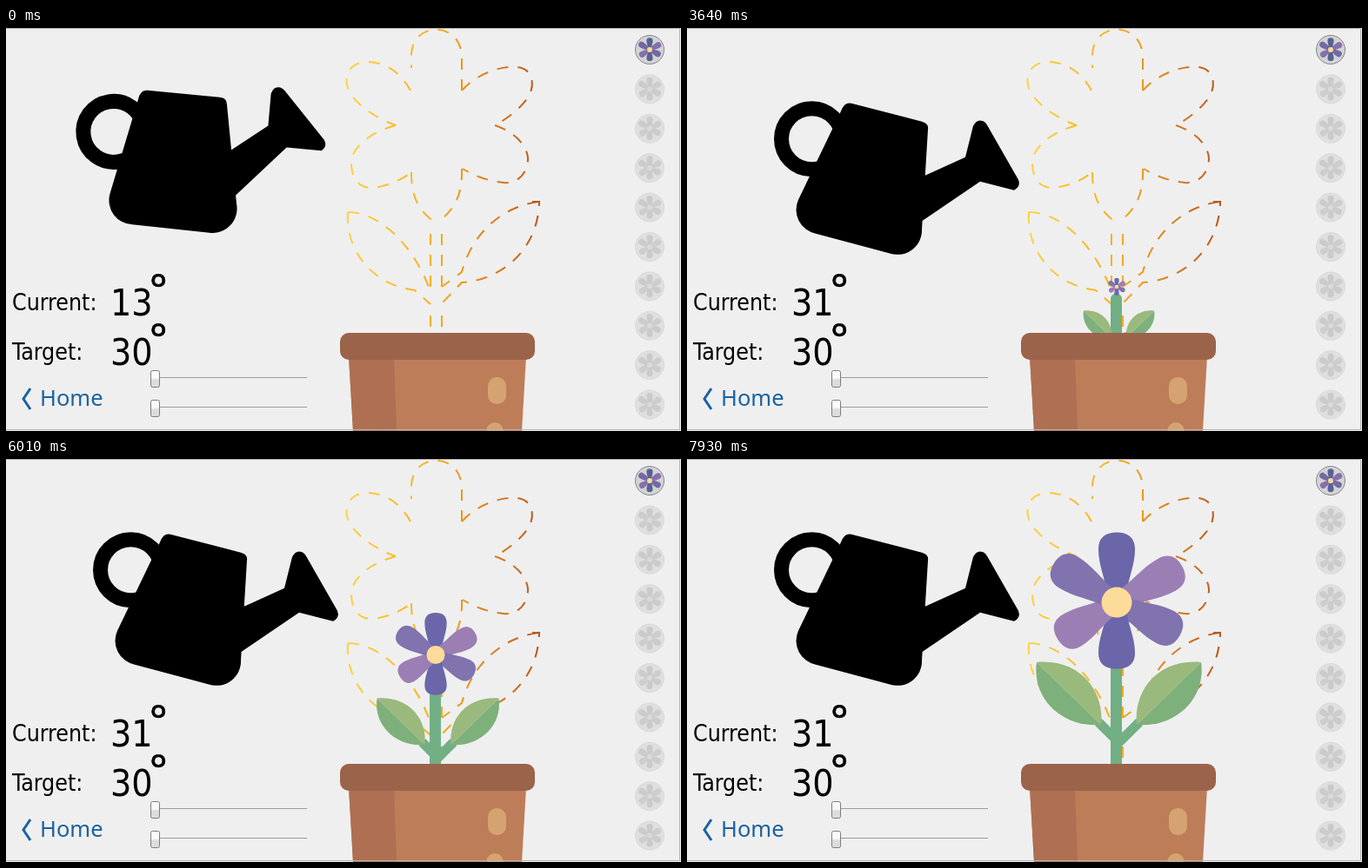
Write an HTML page that moves like this. It is 776x464 px and loops after 8000 ms.

```html
<!DOCTYPE html>
<html lang="en">
<head>
<meta charset="utf-8">
<title>Tilt to water</title>
<style>
  html, body { margin: 0; width: 100%; height: 100%; overflow: hidden; background: #efefef; }
  svg { display: block; width: 100vw; height: 100vh; }
  text { font-family: "DejaVu Sans Condensed", "Noto Sans", sans-serif; }
  .label { font-size: 26.5px; }
  .value { font-size: 42.5px; }
  .degree { font: 48px "Noto Sans", sans-serif; stroke: #000; stroke-width: .6; }
  .home { font: 25.5px "Noto Sans", "Open Sans", sans-serif; fill: #1b629f; }
  .thumb { fill: url(#thumb); stroke: #7c7c7c; }
  .dashes path { fill: none; stroke: url(#warm); stroke-width: 2; stroke-dasharray: 13 11; }
  .stalk { fill: none; stroke: #72af85; }
</style>
</head>
<body>
<svg viewBox="0 0 776 464">
  <defs>
    <linearGradient id="warm" gradientUnits="userSpaceOnUse" x1="390" x2="613" y1="0" y2="0">
      <stop offset="0" stop-color="#ffd23e"/>
      <stop offset=".48" stop-color="#f4ac1c"/>
      <stop offset=".75" stop-color="#d9801f"/>
      <stop offset="1" stop-color="#b9561c"/>
    </linearGradient>
    <linearGradient id="thumb" x1="0" x2="0" y1="0" y2="1">
      <stop offset=".45" stop-color="#fafafa"/>
      <stop offset=".55" stop-color="#dcdcdc"/>
    </linearGradient>
    <path id="petal" d="M-11-8C-13-28-21-42-21-61C-21-74-13-80 0-80S21-74 21-61C21-42 13-28 11-8Z"/>
    <g id="leaf">
      <path fill="#7eb07c" d="M0 0L74-72C80-28 42 4 0 0Z"/>
      <path fill="#9ab97c" d="M0 0C-4-40 25-76 74-72Z"/>
    </g>
  </defs>

  <rect width="776" height="464" fill="#efefef"/>

  <g class="dashes">
    <path d="M524 72V32C522-8 468-8 466 30V46"/>
    <path d="M465 72C453 49 432 38 413 39C391 41 386 62 397 77C407 91 427 105 448 112"/>
    <path d="M524 72C540 54 567 43 588 45C606 47 609 66 600 80C591 93 577 104 562 112"/>
    <path d="M562 112C583 119 599 134 600 150C600 168 587 180 572 178C553 176 538 170 525 162"/>
    <path d="M448 112C423 119 401 133 397 152C396 174 406 184 420 184C437 183 453 176 466 166"/>
    <path d="M466 166C466 192 472 206 488 220V224"/>
    <path d="M524 162C525 190 517 206 501 220V224"/>
    <path d="M488 237V298M488 331V344M501 237V298M501 331V344"/>
    <path d="M393 212C428 212 466 247 486 298"/>
    <path d="M393 212C390 256 421 296 470 302L488 318"/>
    <path d="M612 200C570 206 536 236 524 281L501 298"/>
    <path d="M605 200H613C612 254 571 290 524 293L501 317"/>
  </g>

  <g id="plant">
    <path id="stem" class="stalk" stroke-width="13" stroke-linecap="round"/>
    <path id="stalks" class="stalk" stroke-width="11"/>
    <use id="leafLeft" href="#leaf"/>
    <use id="leafRight" href="#leaf"/>
    <g id="bloom"></g>
  </g>

  <path fill="#bd7d59" d="M394 378H598L593 464H399Z"/>
  <path fill="#ae6f52" d="M394 378H446L449 464H399Z"/>
  <rect x="384" y="351" width="224" height="31" rx="10" fill="#9b634a"/>
  <rect x="554" y="402" width="21" height="31" rx="10" fill="#d5a36f"/>
  <ellipse cx="562" cy="463" rx="9.5" ry="9" fill="#d5a36f"/>

  <g id="can">
    <circle cx="143.5" cy="127" r="35" fill="none" stroke="#000" stroke-width="17"/>
    <path d="M177 95Q181 84 189 86L270 107Q278 109 277 116L270 231A28 28 0 0 1 234 259L148 236A28 28 0 0 1 128 197Z"/>
    <path d="M265 173L320 148L329 112Q333 105 338 106Q342 106 345 111L381 174Q384 182 376 186L337 176L265 225Z"/>
  </g>

  <text class="label" x="7" y="325">Current:</text>
  <text class="label" x="7" y="382">Target:</text>
  <text class="value" id="current" x="120" y="331">13</text>
  <text class="value" x="120" y="388">30</text>
  <text class="degree" x="165" y="317.5">°</text>
  <text class="degree" x="165" y="374.5">°</text>
  <path d="M28 415L20 427L28 439" fill="none" stroke="#1b629f" stroke-width="3"/>
  <text class="home" x="39" y="435">Home</text>

  <path d="M167 402.5H346M167 436.5H346" stroke="#9c9c9c"/>
  <rect class="thumb" x="166.5" y="394.5" width="10" height="19" rx="2"/>
  <rect class="thumb" x="166.5" y="428.5" width="10" height="19" rx="2"/>

  <g id="badges"></g>
  <path d="M0 .5H774.5V462.5H0" fill="none" stroke="#b5b5b5"/>
</svg>

<script>
const LOOP = 8000;
const FULL = 78.5; // bloom radius when fully grown

// [time, displayed angle]
const angles = [
  [0, 13], [70, 12], [240, 11], [470, 12], [550, 14], [620, 16], [700, 18],
  [780, 20], [850, 22], [930, 23], [1000, 24], [1080, 25], [1480, 26],
  [1550, 27], [1720, 28], [1780, 29], [2040, 30], [2870, 31], [4580, 30],
  [5470, 31], [6310, 30], [7150, 31]
];

// Growth runs of eleven steps each: [first step, last step]
const runs = [
  [2040, 2790], [2870, 3640], [3720, 4520], [4580, 5380],
  [5470, 6230], [6310, 7070], [7150, 7930]
];

// [direction, length]
const petals = [[0, 80.5], [61, 86], [117, 82], [180, 76.5], [238, 80], [302, 85]];

const $ = id => document.getElementById(id);
const set = (id, name, value) => $(id).setAttribute(name, value);

function flower(colors, heart) {
  return petals.map(([turn, length], i) =>
    `<use href="#petal" fill="${colors[i % 3]}" transform="rotate(${turn}) scale(1 ${length / 80})"/>`
  ).join("") + `<circle r="17.5" fill="${heart}"/>`;
}

function badge(i) {
  const won = i === 0;
  const disc = won ? 'fill="#d3d3d6" stroke="#85858c"' : 'fill="#dfdfdf" stroke="#dadada"';
  const art = won
    ? flower(["#56628f", "#8571aa", "#7568a4"], "#f6dc9a")
    : flower(["#cacaca", "#cdcdcd", "#cbcbcb"], "#dadada");
  return `<g transform="translate(740 ${25 + 45.4 * i})"><circle r="16.5" ${disc}/>
    <g transform="scale(.17)">${art}</g></g>`;
}

function growthStep(t) {
  const run = runs.findLastIndex(([start]) => t >= start);
  if (run < 0) return -1;
  const [start, end] = runs[run];
  return run * 11 + Math.min(10, Math.floor((t - start) / (end - start) * 10 + 0.1));
}

function drawPlant(step) {
  set("plant", "visibility", step < 0 ? "hidden" : "visible");
  if (step < 0) return;
  const size = 10 + (step - 21) * 1.2455;
  const bloomY = 317.4 - 1.94 * size;
  const leafX = 6.7 + 0.175 * size;
  const leafY = 306 + (FULL - size) * 0.74;
  const leafScale = (26 + 0.613 * size) / 74;
  const [left, right] = [496.5 - leafX, 496.5 + leafX];

  set("stem", "d", `M493.5 ${Math.min(bloomY + 14, 370)}V380`);
  set("stalks", "d", `M${left - 3} ${leafY - 3}L493.5 ${leafY + 493.5 - left}
    M${right + 3} ${leafY - 3}L493.5 ${leafY + right - 493.5}`);
  set("leafLeft", "transform", `translate(${left} ${leafY}) scale(${-leafScale} ${leafScale})`);
  set("leafRight", "transform", `translate(${right} ${leafY}) scale(${leafScale})`);
  set("bloom", "transform", `translate(494 ${bloomY}) scale(${Math.max(0, size / FULL)})`);
}

function draw() {
  const t = performance.now() % LOOP;
  const angle = angles.findLast(([start]) => t >= start)[1];
  $("current").textContent = angle;
  set("can", "transform", `translate(0 .7) rotate(${(angle - 31) / 2} 81 248)`);
  drawPlant(growthStep(t));
  requestAnimationFrame(draw);
}

$("bloom").innerHTML = flower(["#6a66a9", "#9b7fb4", "#8073ae"], "#fddb98");
$("badges").innerHTML = Array.from({ length: 10 }, (_, i) => badge(i)).join("");
draw();
</script>
</body>
</html>
```
